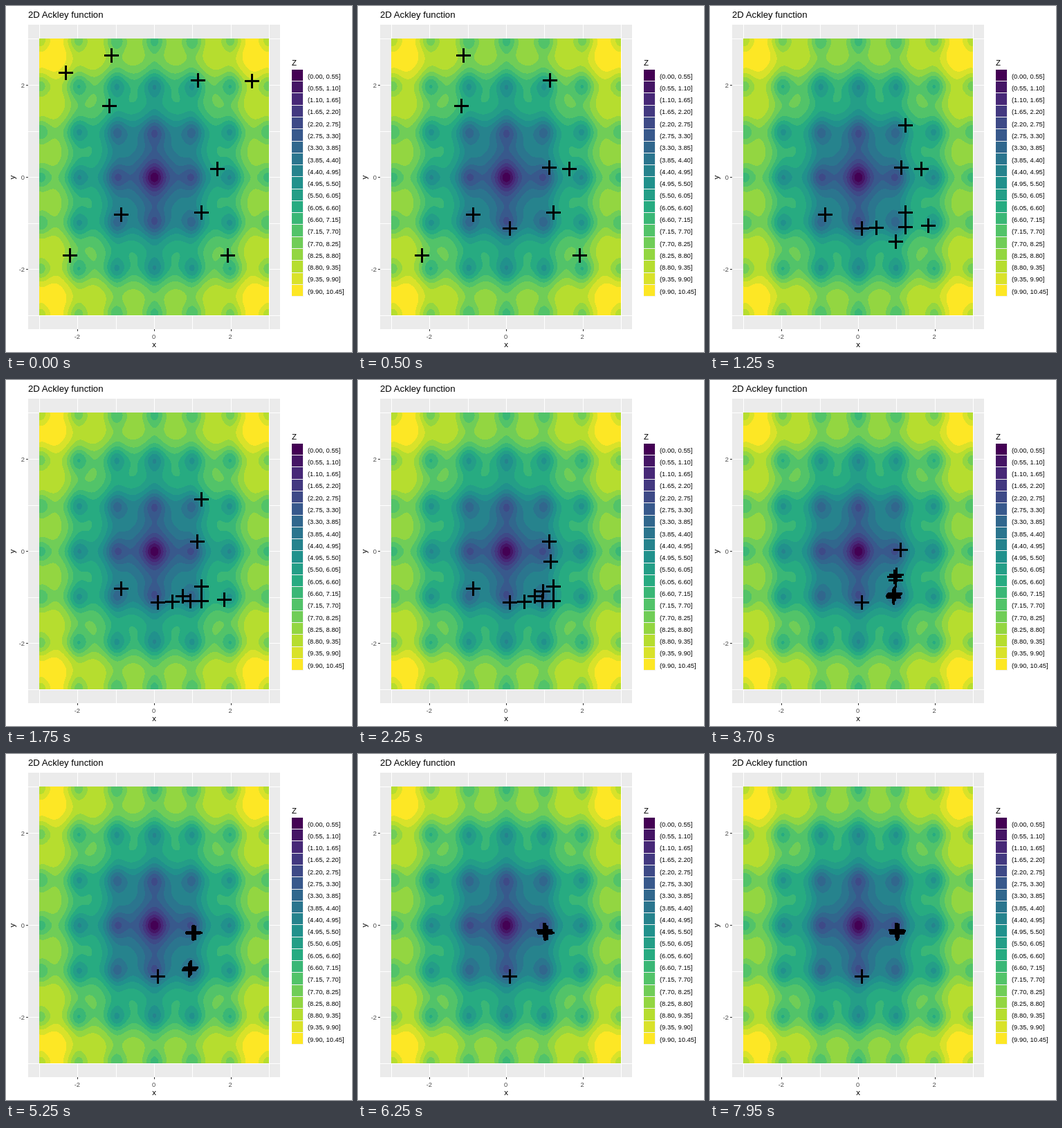
An HTML page with a canvas for the animation above (8000 ms loop, 500 px wide and 500 px high).

```html
<!DOCTYPE html>
<html lang="en">
<head>
<meta charset="utf-8">
<title>2D Ackley function</title>
<style>
html, body { margin: 0; width: 100%; height: 100%; overflow: hidden; background: #fff; }
canvas, svg { position: absolute; left: 0; top: 0; }
text { font-family: "Liberation Sans", Arial, sans-serif; }
.small { font-size: 9.4px; }
.axis { font-size: 11.5px; }
#crosses { stroke: #000; stroke-width: 3; fill: none; shape-rendering: crispEdges; }
</style>
</head>
<body>
<canvas id="plot" width="500" height="500"></canvas>
<svg id="layer" width="500" height="500" viewBox="0 0 500 500">
  <text x="32" y="17" font-size="13.2">2D Ackley function</text>
  <text class="axis" x="214" y="493" text-anchor="middle">x</text>
  <text class="axis" transform="translate(13 247.5) rotate(-90)" text-anchor="middle">y</text>
  <text class="axis" x="413" y="86">Z</text>
  <path id="crosses"/>
</svg>
<script>
const STEP = 0.55, BANDS = 19, LOOP = 8000, HOLD = 200, PERIOD = 250;
const CX = 214, CY = 247.2, UX = 55.3, UY = 66.6;
const KEY_TOP = 92.35, KEY_SIZE = 17.28;

const viridis = "440154 472d7b 3b528b 2c728e 21918c 28ae80 5ec962 addc30 fde725".split(" ")
  .map(h => [0, 2, 4].map(i => parseInt(h.slice(i, i + 2), 16)));
const palette = Array.from({ length: BANDS }, (_, i) => {
  const p = i * (viridis.length - 1) / (BANDS - 1), k = Math.floor(p), next = viridis[Math.ceil(p)];
  return viridis[k].map((c, j) => Math.round(c + (next[j] - c) * (p - k)));
});

function ackley(x, y) {
  const w = 2 * Math.PI;
  return 20 - 20 * Math.exp(-0.2 * Math.sqrt((x * x + y * y) / 2))
    + Math.E - Math.exp((Math.cos(w * x) + Math.cos(w * y)) / 2);
}
const valueAt = ([px, py]) => ackley((px - CX) / UX, (CY - py) / UY);

function drawPanel() {
  const g = document.getElementById("plot").getContext("2d");
  const rect = (color, ...box) => { g.fillStyle = color; g.fillRect(...box); };
  rect("#fff", 0, 0, 500, 500);
  rect("#ebebeb", 32, 27, 364, 440);
  for (let i = -3; i <= 3; i++) {
    const x = Math.round(CX + i * UX), y = Math.round(CY - i * UY);
    rect("#fff", x, 27, 1, 440);
    rect("#fff", 32, y, 364, 1);
    if (i % 2 === 0) {
      rect("#333", x, 467, 1, 3);
      rect("#333", 29, y, 3, 1);
    }
  }
  const w = 332, h = 400, img = g.createImageData(w, h);
  for (let j = 0, p = 0; j < h; j++) {
    for (let i = 0; i < w; i++, p += 4) {
      const band = Math.floor(valueAt([48 + i, 47 + j]) / STEP);
      img.data.set([...palette[Math.min(BANDS - 1, band)], 255], p);
    }
  }
  g.putImageData(img, 48, 47);
  rect("#f2f2f2", 413, 92, 17, 328);
  const keyTop = i => Math.floor(KEY_TOP + i * KEY_SIZE);
  palette.forEach((c, i) => rect(`rgb(${c})`, 413, keyTop(i), 16, keyTop(i + 1) - keyTop(i) - 1));
}

function drawLabels() {
  const layer = document.getElementById("layer");
  const label = (s, x, y, anchor, fill) => {
    const t = document.createElementNS(layer.namespaceURI, "text");
    for (const [k, v] of Object.entries({ x, y, fill, class: "small", "text-anchor": anchor })) t.setAttribute(k, v);
    t.textContent = s;
    layer.appendChild(t);
  };
  for (const v of [-2, 0, 2]) {
    label(v, CX + v * UX - 0.5, 481, "middle", "#4d4d4d");
    label(v, 27, CY - v * UY + 4, "end", "#4d4d4d");
  }
  for (let i = 0; i < BANDS; i++) {
    label(`(${(i * STEP).toFixed(2)}, ${((i + 1) * STEP).toFixed(2)}]`, 436, 104.6 + i * KEY_SIZE, "start", "#000");
  }
}

let seed = 1;
function jitter(spread) {
  const r = Math.sin(seed++ * 12.9898) * 43758.5453;
  return (2 * (r - Math.floor(r)) - 1) * spread;
}
const near = (x, y, spread, count) =>
  Array.from({ length: count }, () => [x + jitter(spread), y + jitter(spread)]);

const start = [[86, 96], [152, 71], [149, 144], [277, 107], [355, 108],
  [305, 235], [166, 301], [282, 298], [92, 360], [320, 360]];
const valley = count => near(264.5, 311, 3, count);
const basin = count => near(270.5, 256, 3, count);

// Better points found by the search, spread evenly up to the given generation.
const phases = [
  [5, [[219, 321], [276, 233], [240, 320], [268, 340], [315, 317], [282, 319], [282, 172]]],
  [9, [[255, 312], [266, 319], [267, 305], [278, 262]]],
  [14, valley(6)], [15, basin(4)], [21, basin(1)], [25, basin(4)], [31, basin(1)]
];

// Every new point takes the place of the worst one.
const states = [start];
let since = 0;
for (const [until, found] of phases) {
  for (let gen = since + 1, k = 0; gen <= until; gen++) {
    const next = states[gen - 1].slice();
    while (k < found.length && since + Math.ceil((k + 1) * (until - since) / found.length) <= gen) {
      const values = next.map(valueAt);
      next[values.indexOf(Math.max(...values))] = found[k++];
    }
    states.push(next);
  }
  since = until;
}

// Each state holds, then passes through a brief in-between pose.
function blend(t) {
  if (t < PERIOD) return t < 150 ? 0 : t < 200 ? 1 / 3 : 2 / 3;
  return t % PERIOD < HOLD ? 0 : 0.5;
}

const crosses = document.getElementById("crosses");
function frame(now) {
  const t = now % LOOP, k = Math.floor(t / PERIOD), f = blend(t);
  const from = states[k], to = states[k + 1] || from;
  crosses.setAttribute("d", from.map((p, i) => {
    const [x, y] = p.map((v, j) => Math.round(v + (to[i][j] - v) * f) + 0.5);
    return `M${x - 10.5} ${y}h21M${x} ${y - 10.5}v21`;
  }).join(""));
  requestAnimationFrame(frame);
}

drawPanel();
drawLabels();
frame(performance.now());
</script>
</body>
</html>
```
